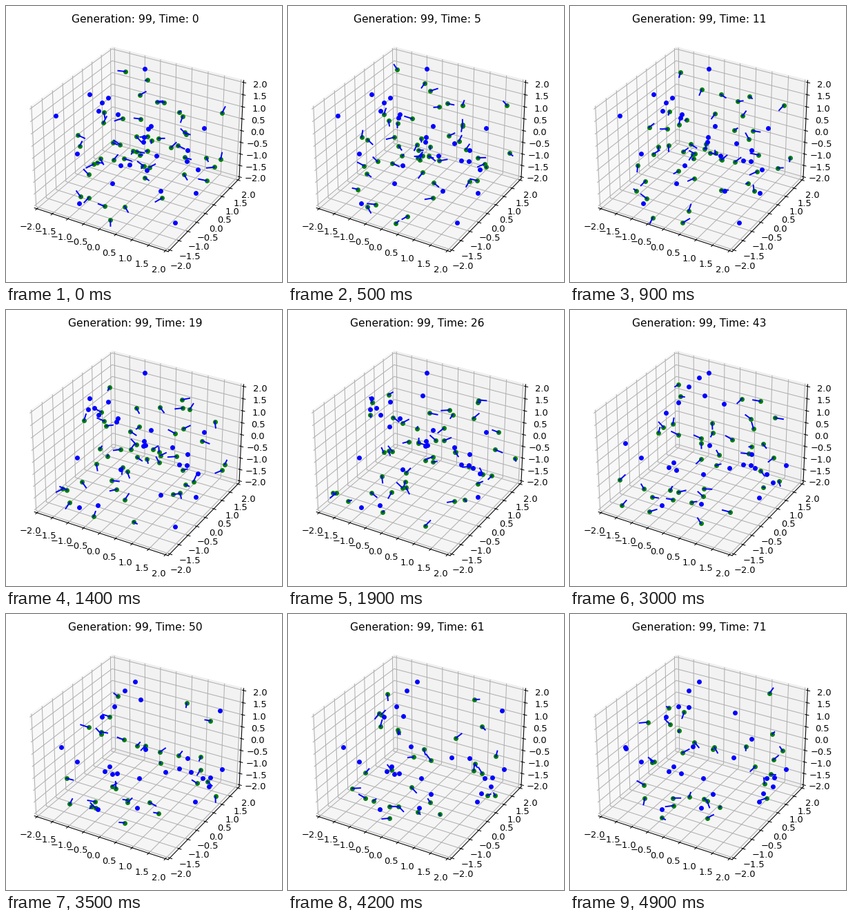
Animation of 400 by 400 pixels, one loop 5 s. Source, as a matplotlib script:

```python
import numpy as np
import matplotlib.pyplot as plt
from matplotlib.animation import FuncAnimation

SIZE = 400
FRAMES = 50
TIMES = 72
ORGANISMS, FOOD = 50, 25
EDGE = 2
SPEED, TURN, TAIL = 0.065, 0.35, 0.22
SCALE = 14 / 15
rng = np.random.default_rng(12)


def unit(v):
    return v / np.linalg.norm(v, axis=-1, keepdims=True)


def bounce(p):
    """Fold unbounded positions back into the box."""
    return EDGE - np.abs((p + EDGE) % (4 * EDGE) - 2 * EDGE)


def wander():
    """Positions and headings of all organisms at every time."""
    heading = unit(rng.normal(size=(ORGANISMS, 3)))
    headings = []
    for _ in range(TIMES + 1):
        headings.append(heading)
        heading = unit(heading + TURN * rng.normal(size=heading.shape))
    start = rng.uniform(-EDGE, EDGE, (ORGANISMS, 3))
    path = bounce(start + SPEED * np.cumsum(headings, axis=0))
    return path[:-1], unit(np.diff(path, axis=0))


places, headings = wander()

# A few starve early, many in the second half, the rest survive.
deaths = np.full(ORGANISMS, TIMES)
deaths[:3] = rng.integers(4, 11, 3)
deaths[3:20] = rng.integers(38, 51, 17)

# Each piece of food is eaten after a while and regrows elsewhere.
lifetimes = rng.uniform(15, 100, FOOD)
ages = rng.uniform(0, lifetimes)
spots = rng.uniform(-EDGE, EDGE, (FOOD, 6, 3))


def clock(frame):
    return max(frame, (3 * frame - 4) // 2)


plt.rcParams.update({
    "font.family": "DejaVu Sans",
    "font.size": 10 * SCALE,
    "grid.linewidth": 0.8 * SCALE,
    "axes.linewidth": 0.8 * SCALE,
    "xtick.major.width": 0.8 * SCALE,
    "ytick.major.width": 0.8 * SCALE,
    "xtick.major.pad": 2.5,
    "ytick.major.pad": 2.5,
})
fig = plt.figure(figsize=(4, 4), dpi=100)
box = fig.add_axes([15.2 / SIZE, 22.3 / SIZE, 345 / SIZE, 345 / SIZE],
                   projection="3d")
title = fig.text(187.5 / SIZE, 1 - 24 / SIZE, "", size=12 * SCALE,
                 ha="center", va="baseline")

dots = dict(marker="o", ls="", ms=5, mew=0)
organisms, = box.plot([], [], [], color="green", zorder=3, **dots)
food, = box.plot([], [], [], color="blue", zorder=4, **dots)
tails, = box.plot([], [], [], color="blue", lw=1.5 * SCALE, zorder=5)

limits = (-EDGE * 25 / 24, EDGE * 25 / 24)
ticks = np.linspace(-EDGE, EDGE, 9)
box.set(xlim=limits, ylim=limits, zlim=limits,
        xticks=ticks, yticks=ticks, zticks=ticks)


def draw(frame):
    t = clock(frame)
    title.set_text(f"Generation: 99, Time: {t}")

    alive = deaths > t
    heads = places[t, alive]
    tips = heads + TAIL * headings[t, alive]
    gaps = np.full_like(heads, np.nan)
    organisms.set_data_3d(*heads.T)
    tails.set_data_3d(*np.stack([heads, tips, gaps], axis=1).reshape(-1, 3).T)

    regrowths = ((t + ages) // lifetimes).astype(int)
    food.set_data_3d(*spots[np.arange(FOOD), regrowths].T)
    return organisms, food, tails, title


animation = FuncAnimation(fig, draw, frames=FRAMES, interval=100,
                          repeat=True, repeat_delay=0, blit=False)
plt.show()
```
